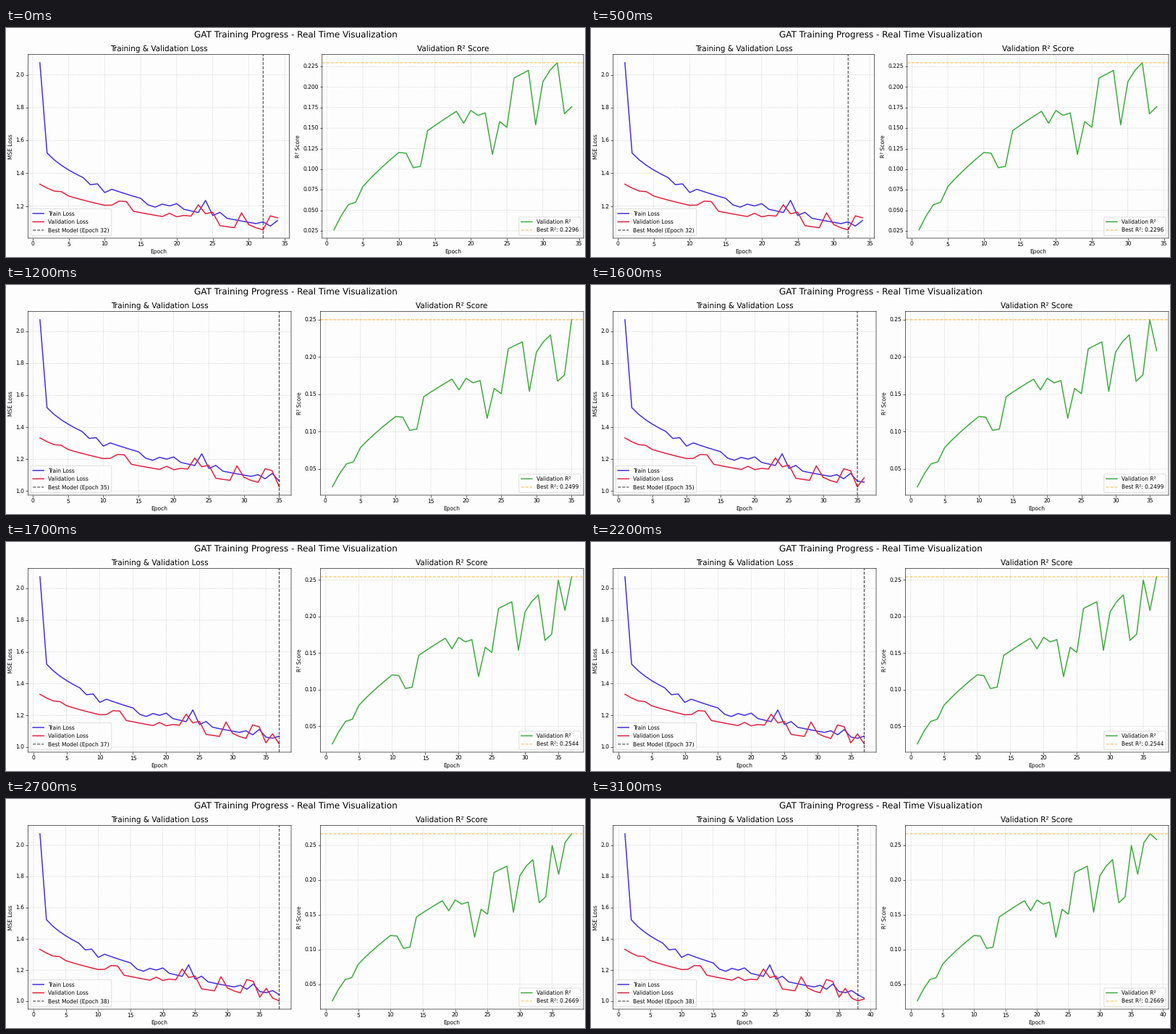
Animation, 800 px wide and 316 px high, one loop 3200 ms. Source, as a matplotlib script:

```python
import numpy as np
import matplotlib.pyplot as plt
from matplotlib.animation import FuncAnimation

W, H, DPI = 800, 316, 100
S = 0.541  # scale of default point sizes
FRAMES, INTERVAL = 32, 100
FIRST, LAST = 34, 39            # epochs plotted at the start and end of the loop
ARRIVALS = (6, 16, 17, 23, 29)  # steps at which one more epoch arrives

BLUE, RED, GREEN = "#412fe0", "#e0213f", "#3eaa3e"
PAPER = "#fdfdfd"

plt.rcParams.update({
    "font.family": "DejaVu Sans",
    "font.size": 10 * S,
    "text.hinting": "none",
    "path.snap": False,
    "axes.titlesize": 14 * S,
    "axes.titlepad": 6 * S,
    "axes.labelsize": 10 * S,
    "axes.labelpad": 2 * S,
    "axes.linewidth": 0.8 * S,
    "axes.facecolor": PAPER,
    "figure.facecolor": PAPER,
    "savefig.facecolor": PAPER,
    "grid.linewidth": 0.8 * S,
    "legend.fontsize": 10 * S,
    "lines.linewidth": 2 * S,
    "patch.linewidth": 1.0 * S,
})
for axis in ("xtick", "ytick"):
    plt.rcParams.update({
        f"{axis}.labelsize": 10 * S,
        f"{axis}.major.size": 3.5 * S,
        f"{axis}.major.width": 0.8 * S,
        f"{axis}.major.pad": 3.5 * S,
    })


def power_trend(start, gain, power, turns):
    """A power law over the epochs, pulled off course at a few turns."""
    y = start + gain * np.arange(1, LAST + 1) ** power
    for epoch, value in turns.items():
        y[epoch - 1] = value
    return y


train = power_trend(1.8158, -0.2329, 0.33, {
    1: 2.074, 8: 1.33, 10: 1.282, 16: 1.207, 17: 1.193, 20: 1.214,
    24: 1.234, 26: 1.161, 32: 1.103, 34: 1.111, 37: 1.069, 39: 1.021})
r2 = power_trend(-0.0107, 0.03694, 0.55, {
    4: .0597, 11: .1195, 12: .1018, 13: .1035, 19: .156, 20: .1715,
    21: .1655, 22: .1685, 23: .118, 24: .158, 25: .151, 29: .154,
    30: .2065, 31: .2205, 32: .2296, 33: .1675, 34: .176, 35: .2499,
    36: .2085, 37: .2544, 38: .2669, 39: .2585})
VARIANCE = 1.3689
valid = VARIANCE * (1 - r2)  # R² = 1 - MSE / variance

fig = plt.figure(figsize=(W / DPI, H / DPI), dpi=DPI)
fig.text(0.5, 1 - 12.4 / H, "GAT Training Progress - Real Time Visualization",
         fontsize=16 * S, ha="center", va="baseline")
loss_ax = fig.add_subplot(1, 2, 1)
score_ax = fig.add_subplot(1, 2, 2)


def place(ax, left, right, top=36.4, bottom=290):
    ax.set_position([left / W, 1 - bottom / H,
                     (right - left) / W, (bottom - top) / H])


def finish(ax, title, ylabel, corner):
    ax.set_title(title)
    ax.set_xlabel("Epoch")
    ax.set_ylabel(ylabel)
    ax.grid(True, linestyle="--", alpha=0.5)
    ax.legend(loc=corner)


def update(i):
    n = FIRST + sum(i >= a for a in ARRIVALS)
    epochs = np.arange(1, n + 1)
    best = int(np.argmax(r2[:n]))

    loss_ax.clear()
    loss_ax.plot(epochs, train[:n], color=BLUE, label="Train Loss")
    loss_ax.plot(epochs, valid[:n], color=RED, label="Validation Loss")
    loss_ax.axvline(best + 1, color="black", linestyle="--", lw=1.5 * S,
                    alpha=0.7, label=f"Best Model (Epoch {best + 1})")
    finish(loss_ax, "Training & Validation Loss", "MSE Loss", "lower left")

    score_ax.clear()
    score_ax.plot(epochs, r2[:n], color=GREEN, label="Validation R²")
    score_ax.axhline(r2[best], color="orange", linestyle="--", lw=1.5 * S,
                     alpha=0.65, label=f"Best R²: {r2[best]:.4f}")
    finish(score_ax, "Validation R² Score", "R² Score", "lower right")

    # three-decimal tick labels take a little width from both plots
    inset = 2.4 if n == FIRST else 0
    place(loss_ax, 30.4, 394 - inset)
    place(score_ax, 434.4 + inset, 798)
    return []


anim = FuncAnimation(fig, update, frames=FRAMES, interval=INTERVAL,
                     init_func=lambda: update(0), repeat=True, repeat_delay=0,
                     blit=False)
plt.show()
```
